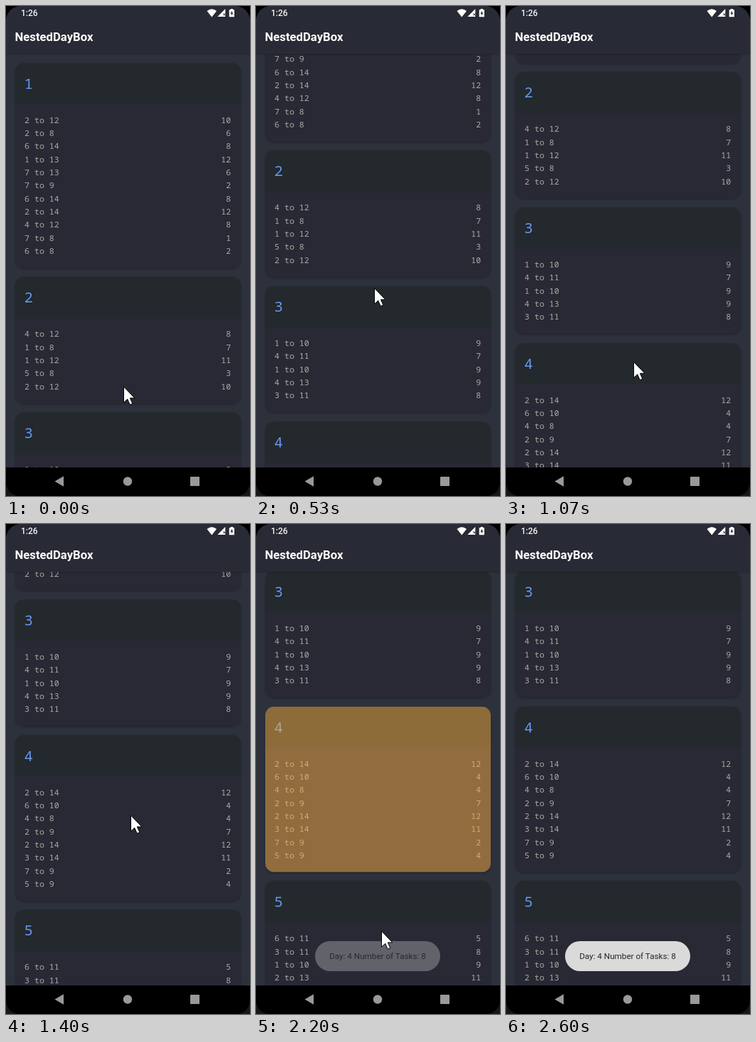
These frames come from a looping animation (343 by 686 pixels, 3.59 s). An HTML page:

```html
<!DOCTYPE html>
<html lang="en">
<head>
<meta charset="utf-8">
<title>NestedDayBox</title>
<style>
  html, body { margin: 0; width: 100%; height: 100%; overflow: hidden; background: #000; }
  #screen { position: relative; width: 343px; height: 686px; overflow: hidden; background: #2d313c; font-family: Roboto, sans-serif; }
  #screen > *, .card, .card > * { position: absolute; }
  #list { left: 0; top: 66px; width: 343px; height: 580px; overflow: hidden; }
  #track { position: absolute; left: 0; top: -66px; width: 343px; }
  .card { left: 12.5px; width: 317px; border-radius: 12.5px; overflow: hidden; background: #282934;
          box-shadow: 0 1.5px 3px rgba(0, 0, 0, .26); font-family: "Noto Sans Mono", monospace; }
  .head { left: 0; top: 0; width: 100%; height: 57.6px; background: #23292c; }
  .day { left: 13px; top: 13px; font-size: 20.8px; line-height: 30px; font-weight: 500; color: #6495ed; }
  .row { left: 13.6px; right: 13.4px; height: 18px; line-height: 18px; display: flex; justify-content: space-between;
         font-size: 11.55px; font-weight: 500; color: #a9aba4; white-space: pre; }
  .ripple { inset: 0; background: #f8b048; opacity: 0; }
  #bar { left: 0; top: 0; width: 343px; height: 67px; background: #282a35; box-shadow: 0 1px 2px rgba(0, 0, 0, .22); }
  #clock { left: 21px; top: 2px; font-size: 12px; line-height: 16px; font-weight: 500; color: #f4f4f5; }
  #title { left: 12.5px; top: 34px; font-size: 16.7px; line-height: 20px; font-weight: 600; color: #fff; white-space: nowrap; }
  #nav { left: 0; top: 646px; width: 343px; height: 40px; background: #000; }
  #toast { left: 83px; top: 584px; width: 176px; height: 42px; border-radius: 21px; background: #dadada; color: #25262a;
           font-size: 11.7px; line-height: 42px; text-align: center; white-space: nowrap; opacity: 0; }
  svg { left: 0; top: 0; overflow: visible; }
</style>
</head>
<body>
<div id="screen">
  <div id="list"><div id="track"></div></div>
  <div id="bar"></div>
  <div id="clock">1:26</div>
  <div id="title">NestedDayBox</div>
  <div id="nav"></div>
  <div id="toast">Day: 4 Number of Tasks: 8</div>
  <svg width="343" height="686">
    <g fill="#fff">
      <path d="M282.5 7Q289.3 1.4 296 7L289.3 15.4Z"/>
      <path d="M308.3 4V15H297.3Z"/>
      <path d="M313.7 5.2H315.7V4H319V5.2H321V15.3H313.7Z"/>
    </g>
    <path d="M318 6.8L315.4 10.7H317V13.6L319.4 9.6H318Z" fill="#282a35"/>
    <path d="M305.2 10.2L308.3 13.4M308.3 10.2L305.2 13.4" stroke="#282a35"/>
    <g fill="#999">
      <path d="M68.5 665.5L81 658.3V672.7Z"/>
      <circle cx="171" cy="665.5" r="6.2"/>
      <rect x="259" y="659" width="13" height="13" rx=".8"/>
    </g>
    <path d="M0 0H18Q3 3 0 18ZM343 0V18Q340 3 325 0Z" fill="#000"/>
    <path d="M0 686V670Q3 683 16 686ZM343 686H327Q340 683 343 670Z" fill="#171717"/>
    <path id="cursor" d="M0 0V22.2L5.2 17.3L8.7 25.2L12.3 23.6L8.9 15.9H15.4Z" fill="#fff" stroke="#000"/>
  </svg>
</div>
<script>
const LOOP = 3590, STEP = 200 / 3;
const GAP = 12.5, ROW = 18.35;
const $ = id => document.getElementById(id);

// Task spans per day; the right column is their length.
const days = [
  "2-12 2-8 6-14 1-13 7-13 7-9 6-14 2-14 4-12 7-8 6-8",
  "4-12 1-8 1-12 5-8 2-12",
  "1-10 4-11 1-10 4-13 3-11",
  "2-14 6-10 4-8 2-9 2-14 3-14 7-9 5-9",
  "6-11 3-11 1-10 2-13"
];

function add(parent, className, text = "") {
  const el = document.createElement("div");
  el.className = className;
  el.textContent = text;
  parent.append(el);
  return el;
}

let cardTop = 79.5;
const ripples = days.map((spans, day) => {
  const rows = spans.split(" ").map(span => span.split("-"));
  const height = 85.4 + ROW * rows.length;
  const card = add($("track"), "card");
  card.style.top = cardTop + "px";
  card.style.height = height + "px";
  add(card, "head");
  add(card, "day", day + 1);
  rows.forEach(([from, to], i) => {
    const row = add(card, "row");
    row.style.top = 71 + ROW * i + "px";
    add(row, "", `${from} to ${to}`);
    add(row, "", to - from);
  });
  cardTop += height + GAP;
  return add(card, "ripple");
});
const ripple = ripples[3];

const ramp = (t, from, to) => Math.min(1, Math.max(0, (t - from) / (to - from)));
const smooth = p => p * p * (3 - 2 * p);

// Two swipes bring the third card to the top.
const scrollAt = t => 206.5 * smooth(ramp(t, 0, 700)) + 297 * smooth(ramp(t, 800, 1580));

// Turning points of the pointer: time, x, y.
const stops = [
  [0, 165.5, 533], [380, 160.5, 380], [800, 180.5, 430], [900, 181, 530], [1400, 175.5, 408],
  [1730, 162.5, 432], [1930, 162.5, 432], [2000, 160, 449], [2200, 176.5, 570], [2270, 180, 633]
];

function pointerAt(t) {
  const i = Math.max(1, stops.findIndex(stop => stop[0] > t));
  const [t0, x0, y0] = stops[i - 1], [t1, x1, y1] = stops[i];
  const p = smooth(ramp(t, t0, t1));
  return [x0 + (x1 - x0) * p, y0 + (y1 - y0) * p];
}

function draw(now) {
  const t = Math.floor((now % LOOP + 4) / STEP) * STEP;
  const [x, y] = pointerAt(t);
  $("track").style.transform = `translateY(${-scrollAt(t)}px)`;
  $("cursor").setAttribute("transform", `translate(${x} ${y})`);
  $("cursor").style.visibility = t < 2270 ? "visible" : "hidden";
  ripple.style.opacity = 0.5 * ramp(t, 2000, 2080) * ramp(t, 2470, 2270);
  ripple.style.clipPath = `circle(${95 + 285 * ramp(t, 2000, 2200)}px at 148px 194px)`;
  $("toast").style.opacity = ramp(t, 2070, 2470);
}

const start = performance.now();
function tick() {
  draw(performance.now() - start);
  requestAnimationFrame(tick);
}
tick();
</script>
</body>
</html>
```
